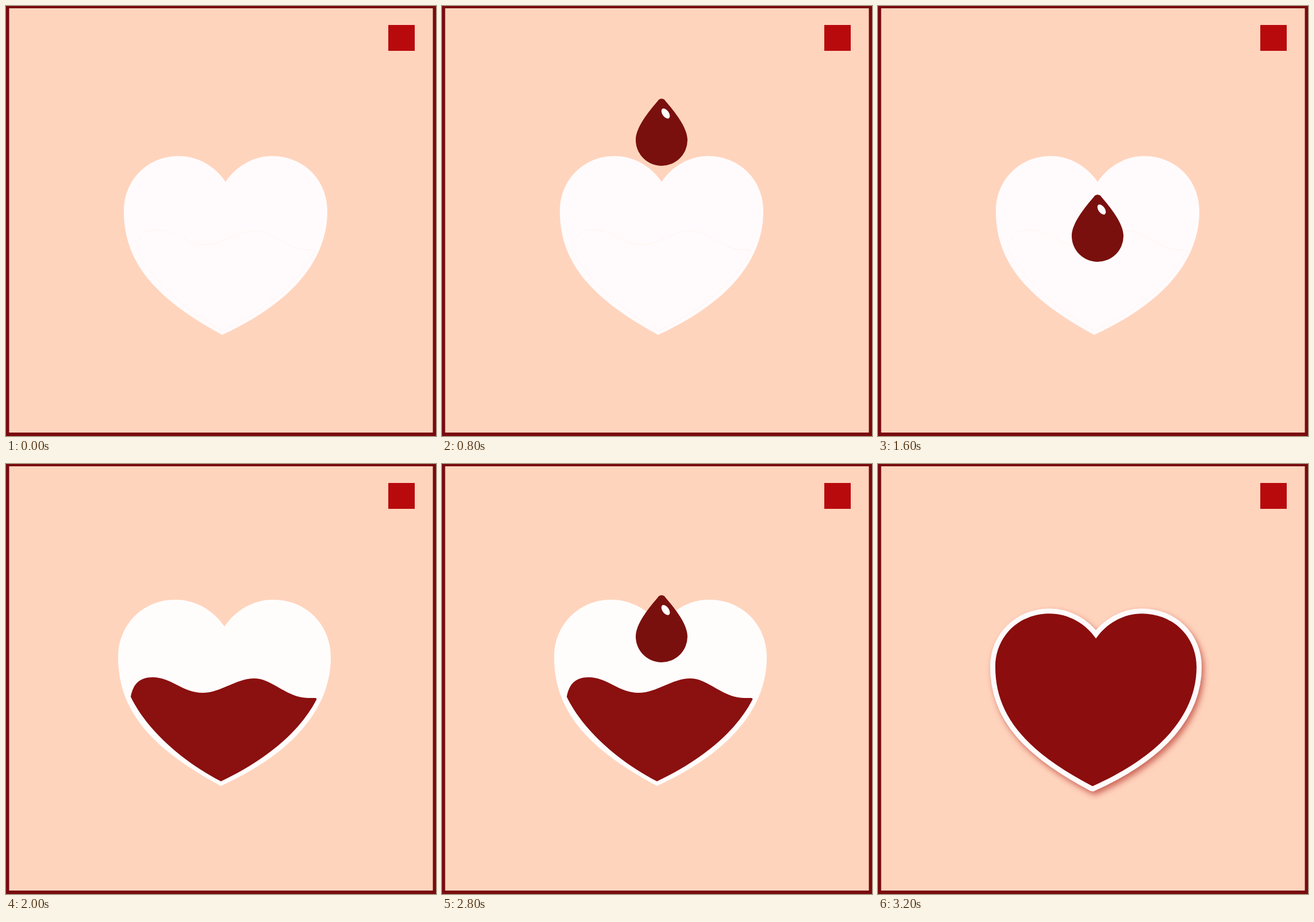
Recreate the animation shown at these times as an HTML page. Size 748 by 748 pixels, loop 3400 ms.

```html
<!DOCTYPE html>
<html lang="en">
<head>
<meta charset="utf-8">
<title>Filling heart</title>
<style>
  html, body { margin: 0; width: 100%; height: 100%; overflow: hidden; background: #780b0f; }
  svg { display: block; width: 100vw; height: 100vh; }
</style>
</head>
<body>
<svg viewBox="0 0 748 748">
  <defs>
    <path id="heart" d="M382 306 C364 279 334 261 300 261 C246 261 205 303 205 357
      C205 448 263 511 376 572 C500 515 559 440 559 357 C559 303 518 261 463 261
      C430 261 400 279 382 306 Z"/>
    <path id="liquid" d="M217 405 C221 383 232 371 255 371 C288 371 307 398 342 398
      C374 398 400 373 432 373 C463 373 488 407 526 407 L538 407 Q541 407 540 410
      C512 464 457 512 374 552 C302 515 243 459 217 405 Z"/>
    <filter id="shadow" x="-20%" y="-20%" width="140%" height="140%">
      <feDropShadow dx="4" dy="6" stdDeviation="5.5" flood-color="#b8382f" flood-opacity=".7"/>
    </filter>
  </defs>

  <rect width="748" height="748" fill="#780b0f"/>
  <rect x="5.5" y="4" width="737" height="738" fill="#ffd4bd"/>
  <rect x="665" y="33" width="46" height="45" fill="#b80a0d"/>

  <g id="empty">
    <use href="#heart" fill="#fffbfc"/>
    <use href="#liquid" transform="matrix(.963 0 0 .972 17 28.4)" fill="none" stroke="#fdf3ee"/>
  </g>
  <g id="half">
    <use href="#heart" transform="matrix(1.045 0 0 1.042 -19.2 -36)" fill="#fffdfc"/>
    <use href="#liquid" fill="#8b1010"/>
  </g>
  <g id="full" filter="url(#shadow)">
    <use href="#heart" transform="matrix(.989 0 0 .966 1.3 8)" fill="#8b1010"
      stroke="#fefafb" stroke-width="18" stroke-linejoin="round"/>
    <use href="#heart" transform="matrix(.989 0 0 .966 1.3 8)" fill="#8b1010"/>
  </g>
  <g id="drop">
    <path fill="#79100e" d="M-6.5 4 C-4 -1 4 -1 6.5 4 C22 22 45 50 45 72
      A45 45 0 0 1 -45 72 C-45 50 -22 22 -6.5 4 Z"/>
    <ellipse cx="7" cy="26" rx="5.6" ry="10" transform="rotate(-35 7 26)" fill="#fffdfc"/>
  </g>
</svg>
<script>
  const LOOP = 3400;
  const el = id => document.getElementById(id);
  const hearts = ["empty", "half", "full"];
  const start = performance.now();

  // Each fall moves in held steps; null means no drop in view.
  function dropY(t) {
    if (t >= 400 && t < 2000) return 161 + 83.5 * (Math.floor(t / 400) - 2);
    if (t >= 2400 && t < 3200) return 114 + 57 * Math.floor((t - 2400) / 200);
    return null;
  }

  function render(t) {
    const stage = t < 2000 ? "empty" : t < 3200 ? "half" : "full";
    for (const id of hearts) el(id).style.display = id === stage ? "" : "none";
    const y = dropY(t);
    el("drop").style.display = y === null ? "none" : "";
    if (y !== null) el("drop").setAttribute("transform", `translate(382 ${y})`);
  }

  function tick() {
    render((performance.now() - start) % LOOP);
    requestAnimationFrame(tick);
  }
  tick();
</script>
</body>
</html>
```
